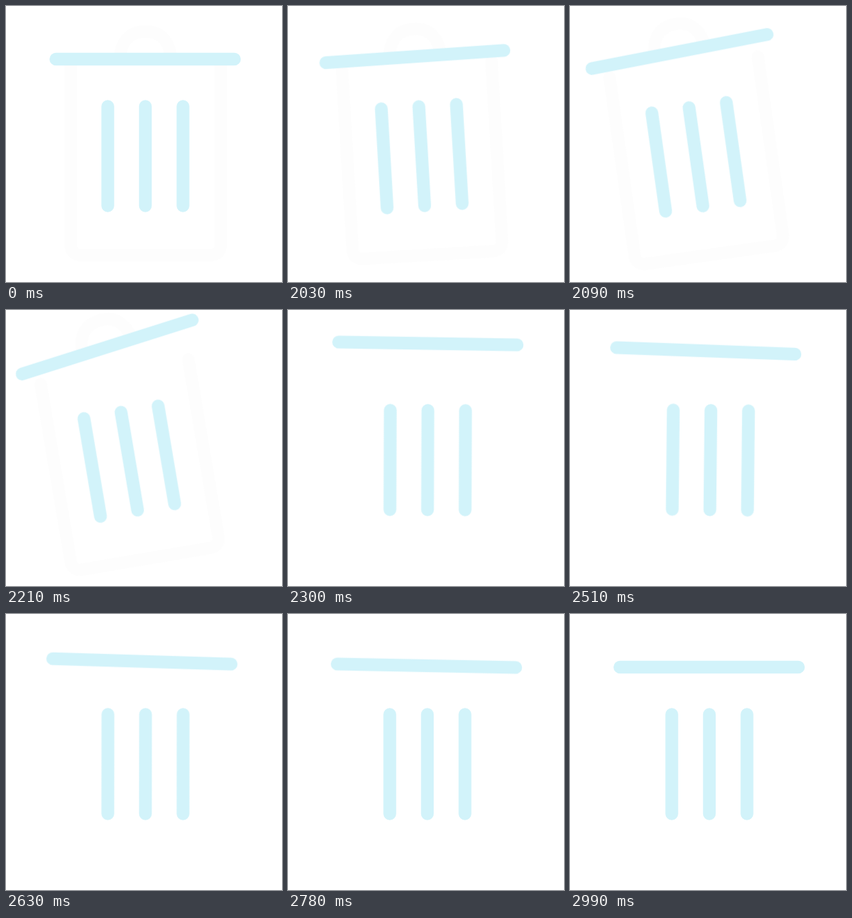
These frames come from a looping animation (400 by 400 pixels, 3020 ms). An HTML page:

```html
<!DOCTYPE html>
<html lang="en">
<head>
<meta charset="utf-8">
<title>Bin</title>
<style>
html, body { margin: 0; width: 100%; height: 100%; overflow: hidden; background: #fff; }
svg { display: block; width: 100vw; height: 100vh; }
path { fill: none; stroke: #d2f3fa; stroke-width: 18.5; stroke-linecap: round; }
.faint { stroke: #fdfdfd; stroke-width: 18; animation: fade 3020ms step-end infinite; }
.bin { transform-origin: 200px 357px; animation: sway 3020ms infinite; }
.lid { transform-origin: 201.5px 77px; animation: hop 3020ms infinite; }

/* Each segment advances in 30 ms steps. */
@keyframes sway {
  0%      { transform: rotate(0deg); animation-timing-function: step-end; }
  67.218% { transform: rotate(-3.35deg); animation-timing-function: steps(2); }
  69.205% { transform: rotate(-8deg); animation-timing-function: steps(2); }
  71.192% { transform: rotate(-10.2deg); animation-timing-function: steps(2); }
  73.178% { transform: rotate(-9.6deg); animation-timing-function: steps(1); }
  74.172% { transform: rotate(-7.5deg); animation-timing-function: steps(2); }
  76.158% { transform: rotate(.2deg); animation-timing-function: steps(2); }
  78.145% { transform: rotate(4.4deg); animation-timing-function: steps(2); }
  80.132% { transform: rotate(3deg); animation-timing-function: steps(3); }
  83.112% { transform: rotate(.6deg); animation-timing-function: steps(2); }
  85.099% { transform: rotate(.2deg); animation-timing-function: steps(3); }
  88.079%, 100% { transform: rotate(0deg); }
}
@keyframes hop {
  0%      { transform: translate(0px, 0px) rotate(0deg); animation-timing-function: step-end; }
  67.218% { transform: translate(-1.2px, -4.2px) rotate(-.6deg); animation-timing-function: steps(2); }
  69.205% { transform: translate(-2px, -14px) rotate(-3deg); animation-timing-function: steps(2); }
  71.192% { transform: translate(-3px, -23px) rotate(-6deg); animation-timing-function: steps(2); }
  73.178% { transform: translate(-3.7px, -28px) rotate(-8deg); animation-timing-function: steps(1); }
  74.172% { transform: translate(-3px, -34px) rotate(-9deg); animation-timing-function: steps(2); }
  76.158% { transform: translate(0px, -28.5px) rotate(.7deg); animation-timing-function: steps(2); }
  78.145% { transform: translate(-2px, -26px) rotate(2deg); animation-timing-function: steps(2); }
  80.132% { transform: translate(-5px, -23px) rotate(2deg); animation-timing-function: steps(3); }
  83.112% { transform: translate(-8px, -17.7px) rotate(1.5deg); animation-timing-function: steps(2); }
  85.099% { transform: translate(-7px, -13px) rotate(1.8deg); animation-timing-function: steps(3); }
  88.079% { transform: translate(-4px, -6px) rotate(1.6deg); animation-timing-function: steps(4); }
  92.052% { transform: translate(-1px, -2px) rotate(1.1deg); animation-timing-function: steps(3); }
  95.033% { transform: translate(-.3px, -.6px) rotate(.5deg); animation-timing-function: steps(4); }
  99.006%, 100% { transform: translate(0px, 0px) rotate(0deg); }
}
@keyframes fade {
  0% { opacity: 1; }
  76.158%, 100% { opacity: 0; }
}
</style>
</head>
<body>
<svg viewBox="0 0 400 400">
  <g class="bin">
    <path class="faint" d="M94 86V346Q94 361 109 361H296Q311 361 311 346V86"/>
    <path d="M147.5 145.5V289.5M202 145.5V289.5M256.5 145.5V289.5"/>
    <g class="lid">
      <path class="faint" d="M166 68Q172 37 202 37T238 68"/>
      <path d="M72.3 77H331"/>
    </g>
  </g>
</svg>
</body>
</html>
```
